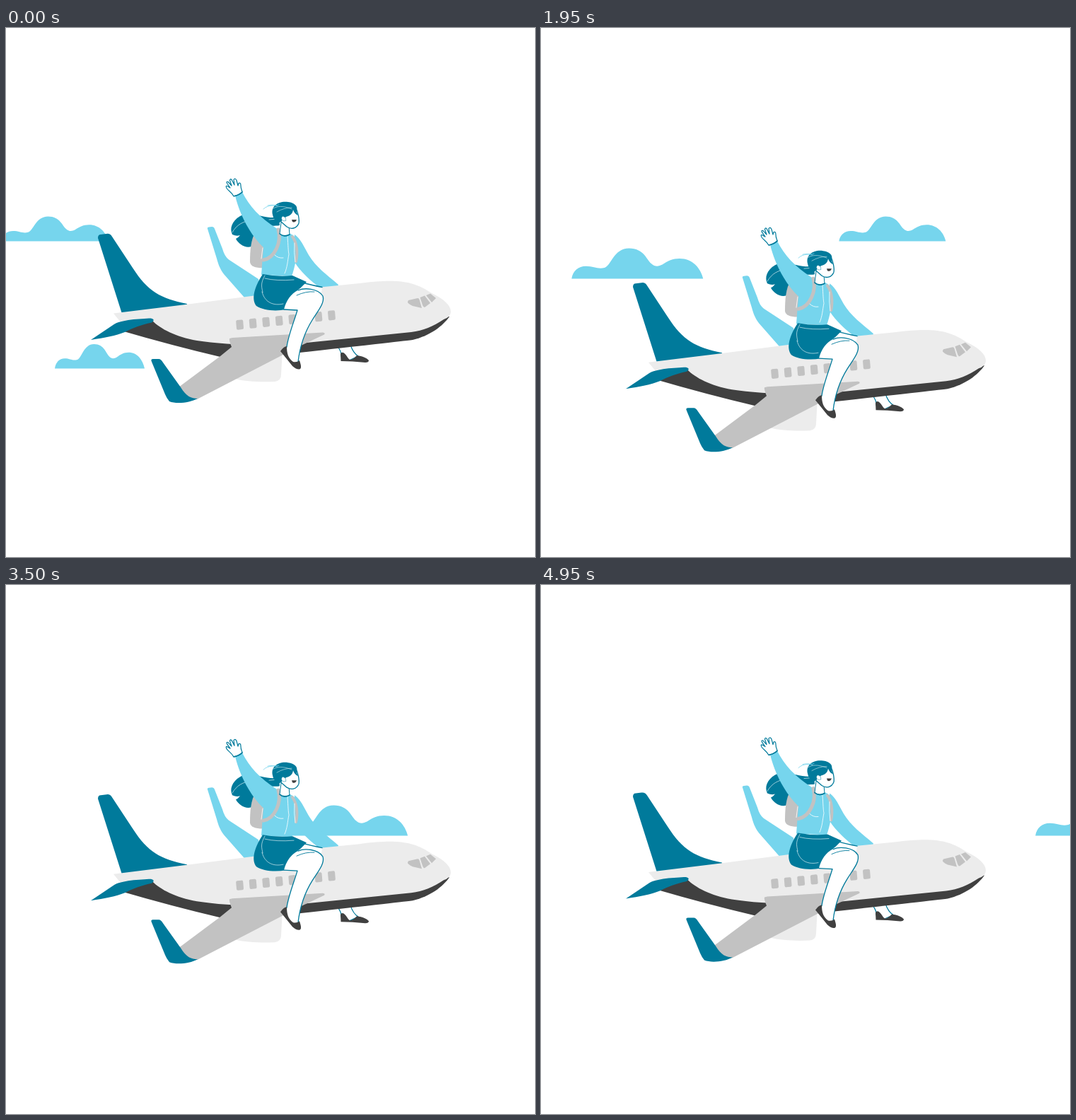
An HTML page with a canvas that plays this animation: 748x748 px, repeating every 5000 ms.

```html
<!DOCTYPE html>
<html lang="en">
<head>
<meta charset="utf-8">
<title>Flying on a plane</title>
<style>
html, body { margin: 0; width: 100%; height: 100%; overflow: hidden; background: #fff; }
canvas { display: block; }
</style>
</head>
<body>
<canvas id="stage" width="748" height="748"></canvas>
<script>
const ctx = document.getElementById('stage').getContext('2d');
const LOOP = 5000, STEP = 50;
const TEAL = '#007a9b', SKY = '#76d5ed', GREY = '#c2c2c2', PALE = '#ececec', DARK = '#404040', WHITE = '#fff';

// Vertical drift of the plane: [time, offset]
const drift = [
  [0, 0], [550, -27.5], [700, -35.5], [975, -48], [1100, -33.5], [1500, 18],
  [1650, 34.5], [1970, 71.5], [2200, 47.5], [2400, 21.5], [2750, -19.7], [2900, -40.5],
  [2965, -47], [3300, -14.5], [3850, 39.5], [4000, 52.5], [4400, 30.7], [5000, 0]
];

// Each cloud starts at x and moves right at speed (px/ms)
const clouds = [
  { x: -6.5, speed: 0.2194, base: 301.4, w: 151, h: 35 },
  { x: 69, speed: 0.2196, base: 481.4, w: 127, h: 34.5 },
  { x: -383, speed: 0.2186, base: 354.4, w: 186, h: 43 }
];
const cloudShape = new Path2D('M0 0C.01-.25 .05-.41 .11-.41C.17-.41 .2-.3 .25-.36C.3-.42 .32-1 .437-1' +
  'C.55-1 .57-.62 .605-.5C.635-.38 .66-.4 .69-.46C.73-.58 .77-.66 .82-.66C.92-.66 .98-.35 1 0Z');

const scene = [];
function shape(fill, d, stroke, width = 1.4) {
  scene.push({ fill, stroke, width, path: new Path2D(d) });
}
const line = (color, d, width = 1) => shape(null, d, color, width);

// Far wing, far arm, far leg
shape(SKY, 'M285 284Q284 282 287 281.5L291 281Q294 281 295 284L306 312Q309 323 315 327.5L357 355L362 384L337 381L308 348C302 340 300 333 298 326Z');
shape(SKY, 'M408 292C417 298 421 309 428 321C438 338 454 349 470 363L468 370L446 369C430 357 417 345 408 331Z');
shape(WHITE, 'M468 448C471 455 475 457 474 464L485 470L498 464C493 461 490 457 487 448Z', TEAL, 1.2);
shape(DARK, 'M473.5 471L473 461Q474 458 477 459C481 461 483 467 486 469Q491 469 496 463C504 464 511 467 513 470Q513 473 508 473L490 471.5Z');

// Fuselage and tail
shape(TEAL, 'M130 297Q130 292 134 292L142 291Q147 290 150 295L179 339C201 373 218 382 256 390L255 398L164 404Z');
shape(PALE, 'M325 478L391 454L389 490Q389 499 380 500C361 501 339 500 323 496Z');
shape(DARK, 'M163 428L206 412L627 408C618 421 600 435 575 441Q550 444 415 459L303 465Q235 449 163 428Z');
shape(PALE, 'M152 403.5L256 390.7L440 367L500 361C555 354 577 358 602 375C620 384 629 392 629 402Q628 409 619 412C604 422 590 428 573 430L415 446C370 450 306 448 270 442C240 437 218 425 207 414L163 417Z');
shape(TEAL, 'M120 441L152 419.5C162 412.5 190 411 205 410.5Q212 412 206 416.5C190 420 180 424 168 430C155 435 140 438 120 441Z');

// Windows
for (let i = 0; i < 8; i++) {
  const x = 325 + 18.55 * i, y = 413.3 - 1.9 * i;
  shape(GREY, `M${x + 2} ${y - .2}l6-.6q2-.2 2.2 1.8l.8 9.6q.2 2-1.8 2.2l-6 .6q-2 .2-2.2-1.8l-.8-9.6q-.2-2 1.8-2.2Z`);
}
shape(GREY, 'M569 385L582 382Q584 382 584.5 384L588 396L575 393Q567 389 568 387Z');
shape(GREY, 'M585.5 381L592 378.5L600 389L592 395Q590 395 589 392Z');
shape(GREY, 'M594 378L600 375.5L608 382L602 388Z');

// Near wing
shape(GREY, 'M320 438L448 430.5Q452 431 450 433.5L415 450L271 524.5Q257 528 244 508L303 464L319 451Q315 441 316 439Z');
shape(TEAL, 'M206 472Q204 468 208 468L216 468Q219 468 222 473L247 508C255 521 262 524 271 524C260 530 241 532 231 528Q227 523 225 518Z');

// Hair and backpack
shape(TEAL, 'M386 267C371 272 346 258 331 266C319 273 316 284 320 292Q326 295 331 293Q328 297 325 298C329 306 339 312 347 309C354 301 350 292 358 285C367 277 376 281 387 279Z');
line(WHITE, 'M320 289C326 278 336 273 347 272M372 271L383 270', .6);
shape(GREY, 'M353 288C346 299 345 315 345 331C346 338 355 340 369 339L374 289Z');

// Torso and raised arm
shape(SKY, 'M324 237L334 232C344 252 359 268 382 283Q391 289 402 291Q410 294 411 302C412 321 409 337 404 351L361 349L364 310C346 293 331 266 324 237Z');
line(GREY, 'M385 285C390 303 380 325 364 328', 5);
line(GREY, 'M405 295C411 303 413 317 410 330', 4);
line(WHITE, 'M398 294C399 309 399 315 400 320C398 330 398 338 394 347M380 321Q385 326 392 325M363 311L361 326M408 304Q407 318 409 331', .8);

// Waving hand
shape(WHITE, 'M322 238C319 232 314 230 312 226.5Q310 222.5 313 223.5L317 226L312.5 219.5Q311 216.5 314 217.5L319 223L316.5 215.5Q317 212.5 319 214.5L323 222L322 214.5Q324 211.5 326 215.5L328 223L329 219.5Q332 218 332 223C332 228 334 230 334 232Q328 237 322 238Z', TEAL, 1.2);
line(TEAL, 'M323 237.5Q330 236 334 232', 1.6);

// Neck, face, hair cap
shape(WHITE, 'M389 275L387 291Q394 297 401 292L400 280Z', TEAL, 1);
line(TEAL, 'M387 291Q393 296 401 292', 1.6);
shape(WHITE, 'M410 255C413 260 415 271 414 276C411 284 403 285 397 281L389 274L390 257Z', TEAL, 1.3);
shape(TEAL, 'M377 264C374 251 386 244 399 246C408 247 413 252 411 258C411 262 413 264 413 265Q408 263 406 257C405 264 400 266 396 267L387 275C380 273 378 269 377 264Z');
shape(WHITE, 'M395 268Q390 264 389.5 269Q390 274 395.5 272.5Z', TEAL, .5);
shape(DARK, 'M404 271L411 271Q409 276 405 274Z');
line(WHITE, 'M378 255C386 250 397 253 404 256M383 260Q393 254 404 254', .5);
line(SKY, 'M364 256C371 249 379 252 386 250M370 251Q378 249 384 252', .8);

// Skirt, far knee and near leg
shape(WHITE, 'M414 359L424 359Q435 364 447 366.5L446 374L410 372Z');
line(TEAL, 'M417 359.5Q434 364 447 366.5', 1.3);
shape(TEAL, 'M363 348Q384 352 405 350L425 359L416 368C407 374 398 387 396 398C380 401 363 399 354 393C347 384 350 368 363 348Z');
line(WHITE, 'M366 350C359 362 362 367 363 374M362 373C366 389 379 393 392 390M366 354Q382 358 407 356', .6);
shape(WHITE, 'M393 398C396 386 403 375 413 371C422 367 441 368 448 379C451 389 441 400 433 413C423 429 416 447 413 472L411 476L396 464L397 451C399 435 407 416 412 399Z');
line(TEAL, 'M413 371C422 367 441 368 448 379C451 389 441 400 433 413C423 429 416 447 413 472M393 398L412 399C407 416 399 435 397 451', 1.3);
line(TEAL, 'M411 378Q424 372 436 373', .9);
shape(DARK, 'M388 457Q393 450 397 450C397 460 399 467 406 472Q412 473 415 470C417 476 418 480 416 482Q412 484 405 478L397 468Z');

function driftAt(t) {
  const i = drift.findIndex(([time], k) => k > 0 && t <= time);
  const [t0, y0] = drift[i - 1], [t1, y1] = drift[i];
  return y0 + (y1 - y0) * (t - t0) / (t1 - t0);
}

function drawCloud({ x, speed, base, w, h }, t) {
  ctx.save();
  ctx.translate(x + speed * t, base);
  ctx.scale(w, h);
  ctx.fillStyle = SKY;
  ctx.fill(cloudShape);
  ctx.restore();
}

function draw(t) {
  ctx.fillStyle = WHITE;
  ctx.fillRect(0, 0, 748, 748);
  clouds.forEach(cloud => drawCloud(cloud, t));
  ctx.save();
  ctx.translate(0, driftAt(t));
  ctx.lineCap = ctx.lineJoin = 'round';
  for (const { fill, stroke, width, path } of scene) {
    if (fill) {
      ctx.fillStyle = fill;
      ctx.fill(path);
    }
    if (stroke) {
      ctx.strokeStyle = stroke;
      ctx.lineWidth = width;
      ctx.stroke(path);
    }
  }
  ctx.restore();
}

const start = performance.now();
function tick() {
  const t = (performance.now() - start) % LOOP;
  draw(Math.floor(t / STEP) * STEP);
  requestAnimationFrame(tick);
}
tick();
</script>
</body>
</html>
```
